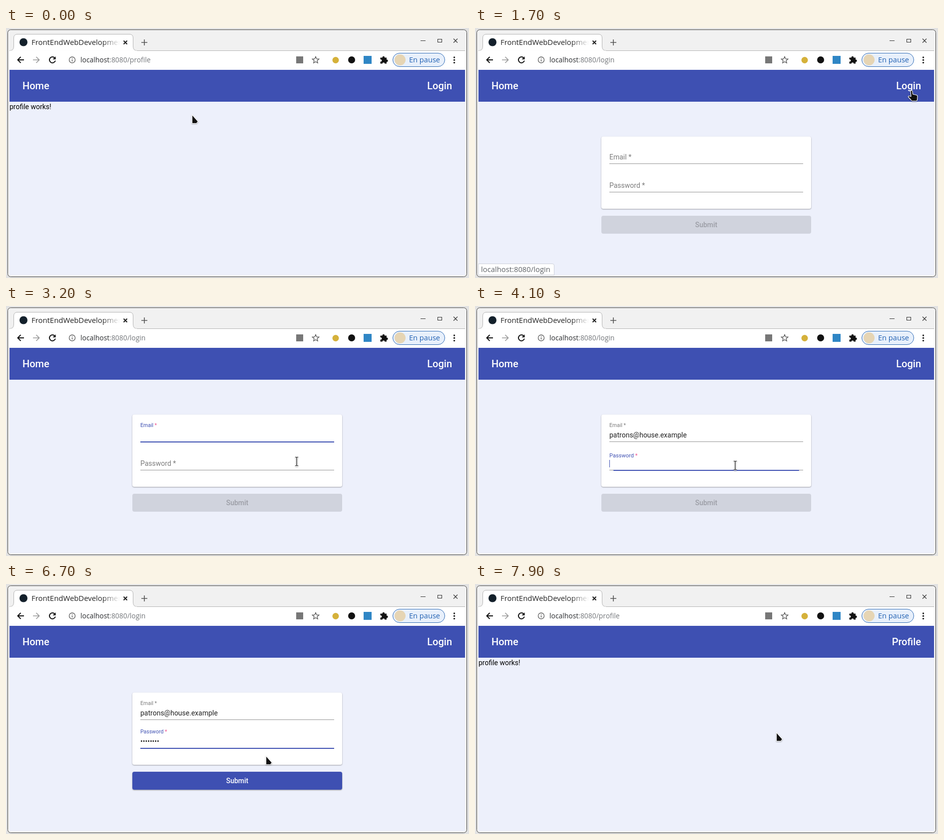
These frames come from a looping animation (927 px wide and 502 px high, 8000 ms). An HTML page:

```html
<!DOCTYPE html>
<html lang="en">
<head>
<meta charset="utf-8">
<title>Login flow</title>
<style>
  html, body { margin: 0; width: 100%; height: 100%; overflow: hidden; background: #e2e2e2; }
  svg { display: block; width: 100vw; height: 100vh; }
  text { font: 14px Roboto, sans-serif; white-space: pre; }
  .ui { font-family: "Open Sans", sans-serif; }
  .nav { font-size: 20px; font-weight: 500; fill: #fff; }
  .line { fill: none; stroke: #111; stroke-width: 2; }
  #card { filter: drop-shadow(0 1px 1px rgba(0,0,0,.35)); }
</style>
</head>
<body>
<svg viewBox="0 0 927 502">
  <defs>
    <linearGradient id="fade" gradientUnits="userSpaceOnUse" x1="192" x2="228" y1="0" y2="0">
      <stop stop-color="#222"/><stop offset="1" stop-color="#222" stop-opacity="0"/>
    </linearGradient>
    <clipPath id="buttonClip"><rect x="253" y="377" width="420" height="36" rx="4"/></clipPath>
  </defs>

  <!-- Window frame and tab strip -->
  <rect x="3.5" y="3.5" width="919" height="496" rx="6" fill="#f1f1f1" stroke="#444"/>
  <path d="M7 46H919V84H7Z" fill="#fff"/>
  <path d="M7 45.5Q15.5 45.5 15.5 37V20Q15.5 12.5 23 12.5H247Q254.500 12.5 254.500 20V37Q254.500 45.5 263 45.5H919" fill="#fff" stroke="#b4b4b4"/>
  <path d="M8 46H262" stroke="#fff"/>
  <circle cx="35" cy="28.500" r="8" fill="#13202b"/>
  <text class="ui" x="51" y="34" style="font-size:14.9px" fill="url(#fade)">FrontEndWebDevelopment</text>
  <path class="line" d="M235.500 25.500l7 7m0-7l-7 7" style="stroke-width:1.8"/>
  <path class="line" d="M271 29H283M277 23V35" style="stroke:#555;stroke-width:1.6"/>
  <path class="line" d="M830 25.500H840M864.500 22.500h8v6h-8zM896 21.500l8 8m0-8l-8 8" style="stroke:#333;stroke-width:1.1"/>

  <!-- Address bar -->
  <path class="line" d="M36 64H23.500M29.500 58L23.500 64L29.500 70"/>
  <path class="line" d="M54 64H66.500M60.500 58L66.500 64L60.500 70" style="stroke:#999;stroke-width:1.7"/>
  <path class="line" d="M97.500 60A6 6 0 1 0 98.800 65.500"/>
  <path d="M99.500 57V63H93.500Z" fill="#111"/>
  <circle cx="132.500" cy="64" r="6" fill="none" stroke="#666" stroke-width="1.4"/>
  <path d="M132.500 60.500v1.500M132.500 63.300v4" stroke="#666" stroke-width="1.5"/>
  <text class="ui" x="149" y="69" style="font-size:13.9px" fill="#2b2d30">localhost<tspan id="path" fill="#74777b"></tspan></text>
  <rect x="581" y="57" width="14" height="14" fill="#777"/>
  <path d="M620 57.500L621.900 61.900L626.700 62.300L623 65.500L624.100 70.200L620 67.700L615.900 70.200L617 65.500L613.300 62.300L618.100 61.900Z" fill="none" stroke="#555" stroke-width="1.3"/>
  <circle cx="660" cy="64.500" r="6.500" fill="#d5b13a"/>
  <circle cx="692" cy="64" r="7" fill="#111"/>
  <rect x="716" y="56" width="16" height="16" fill="#2f86c5"/>
  <path d="M749.500 59.500h4.200a2.200 2.200 0 1 1 4.300 0h4v4.200a2.200 2.200 0 1 1 0 4.300v3.500h-3.800a2.300 2.300 0 1 0-4.600 0h-4.100v-4a2.300 2.300 0 1 0 0-4.400z" fill="#111"/>
  <rect x="774.500" y="50.500" width="104" height="27" rx="13.500" fill="#e8f0fb" stroke="#2d6ab5"/>
  <circle cx="789" cy="64" r="11" fill="#e6d5b4"/>
  <text class="ui" x="807" y="69" style="font-size:14.6px" fill="#2161b3">En pause</text>
  <g fill="#222"><circle cx="897.500" cy="59" r="1.700"/><circle cx="897.500" cy="64.300" r="1.700"/><circle cx="897.500" cy="69.600" r="1.700"/></g>

  <!-- Page -->
  <rect x="7" y="84" width="912" height="412" fill="#edf0fb"/>
  <rect x="7" y="84" width="912" height="64" fill="#3e50b2"/>
  <text class="nav" x="33" y="123">Home</text>
  <text class="nav" id="account" x="893" y="123" text-anchor="end"></text>
  <text id="profile" x="7" y="163">profile works!</text>
  <g id="form">
    <rect id="card" x="253" y="218" width="420" height="145" rx="4" fill="#fff"/>
    <g id="fields"></g>
    <rect id="button" x="253" y="377" width="420" height="36" rx="4"/>
    <circle id="ripple" cx="520" cy="400" fill="#fff" fill-opacity=".1" clip-path="url(#buttonClip)"/>
    <text id="submit" x="463" y="400" text-anchor="middle" font-weight="500" style="font-weight:500">Submit</text>
  </g>
  <g id="status">
    <path d="M7 473.500H155Q158.500 473.500 158.500 477V496H7Z" fill="#fff" stroke="#ccd0da"/>
    <text class="ui" x="12" y="490" style="font-size:14.8px" fill="#5f6368">localhost:8080/login</text>
  </g>

  <g id="pointer" stroke="#fff" stroke-linejoin="round" style="filter:drop-shadow(0 1px 1px rgba(0,0,0,.35))">
    <path id="arrow" d="M.500 0V17.500H9.500L12.500 13.500Z" fill="#111" stroke-width="1.200"/>
    <path id="hand" d="M-2 1Q-2 -.500 0 -.500Q1.800 -.500 2 1.500L2.600 7L9.500 8.500Q12 9 12 11.500L11.500 18.500Q11 20.500 9 20.500H2Q0 20.500 -1.500 18L-6.500 12.500Q-7 11 -5 10.500L-1 11.500Z" fill="#111" stroke-width="1.200"/>
    <g id="beam" fill="none">
      <path d="M-3 -8.500H3M0 -8.500V8.500M-3 8.500H3" stroke-width="3"/>
      <path d="M-3 -8.500H-.800L0 -7.500L.800 -8.500H3M0 -7.500V7.500M-3 8.500H-.800L0 7.500L.800 8.500H3" stroke="#111" stroke-width="1.200"/>
    </g>
  </g>
</svg>
<script>
const LOOP = 8000, STEP = 100;
const EMAIL = "patrons@house.example";
const INDIGO = [62, 80, 178], DISABLED = [208, 211, 221];
const emailFocus = 2663, passwordFocus = 3963, submitPress = 6935;
const keyTimes = [4470, 4700, 5000, 5200, 5700, 5700, 5900, 6100];

// time, x, y, shape; the pointer glides between neighbouring rows
const pointerPath = [
  [0, 372, 174, "arrow"], [500, 372, 174, "arrow"], [600, 620, 140, "arrow"], [700, 849, 106, "hand"],
  [800, 849, 106, "hand"], [900, 832, 118, "arrow"], [1000, 856, 122, "hand"], [1100, 874, 126, "hand"],
  [1700, 874, 126, "hand"], [1800, 862, 140, "hand"], [1900, 820, 168, "arrow"], [2100, 705, 218, "arrow"],
  [2200, 655, 236, "beam"], [2300, 620, 248, "beam"], [2400, 586, 255, "beam"], [2500, 589, 256, "beam"],
  [2700, 589, 256, "beam"], [2800, 588, 272, "beam"], [3000, 582, 312, "beam"], [3500, 582, 312, "beam"],
  [3900, 521, 320, "beam"], [6600, 521, 320, "beam"], [6700, 520, 345, "arrow"], [6800, 518, 380, "hand"],
  [6900, 518, 391, "hand"], [7300, 518, 390, "arrow"], [7800, 518, 390, "arrow"], [7900, 603, 298, "arrow"],
  [LOOP, 603, 298, "arrow"]
];

const $ = id => document.getElementById(id);
const clamp = v => Math.min(1, Math.max(0, v));
const mix = (a, b, p) => a + (b - a) * p;
const set = (el, attrs) => { for (const k in attrs) el.setAttribute(k, attrs[k]); };
const show = (el, on) => { el.style.display = on ? "" : "none"; };

function bezier(x1, y1, x2, y2) {
  const at = (a, b, s) => 3 * a * s * (1 - s) ** 2 + 3 * b * s * s * (1 - s) + s ** 3;
  return x => {
    x = clamp(x);
    let lo = 0, hi = 1;
    for (let i = 0; i < 24; i++) {
      const mid = (lo + hi) / 2;
      if (at(x1, x2, mid) < x) lo = mid; else hi = mid;
    }
    return at(y1, y2, (lo + hi) / 2);
  };
}
const swift = bezier(.25, .8, .25, 1);
const decelerate = bezier(0, 0, .2, 1);

function makeField(name, baseline, focusAt, blurAt) {
  const g = document.createElementNS("http://www.w3.org/2000/svg", "g");
  g.innerHTML = `<text x="269">${name} <tspan>*</tspan></text>
    <text x="269" y="${baseline}" fill="#222"></text>
    <rect x="269" y="${baseline + 8}" width="388" height="1" fill="#949494"/>
    <rect y="${baseline + 8}" height="2" fill="#3e50b2"/>
    <rect y="${baseline - 12}" width="1" height="15" fill="#3e50b2"/>`;
  $("fields").append(g);
  const [label, value, , bar, caret] = g.children;
  const star = label.firstElementChild;

  return (t, text, caretX, caretOn) => {
    const focused = t >= focusAt && t < blurAt;
    const lift = swift((t - focusAt) / 400);
    const width = 388 * mix(.5, 1, swift((t - focusAt) / 300));
    label.setAttribute("y", baseline - 21 * lift);
    label.style.fontSize = 14 - 3.5 * lift + "px";
    label.setAttribute("fill", focused ? "#3e50b2" : "#7c7c7c");
    star.setAttribute("fill", focused ? "#f0508c" : "#7c7c7c");
    value.textContent = text;
    set(bar, { x: 463 - width / 2, width });
    show(bar, focused);
    set(caret, { x: caretX });
    show(caret, focused && caretOn);
  };
}
const drawEmail = makeField("Email", 264, emailFocus, passwordFocus);
const drawPassword = makeField("Password", 321, passwordFocus, submitPress);

function drawPointer(t) {
  const i = pointerPath.findIndex(row => row[0] > t);
  const [t0, x0, y0, shape] = pointerPath[i - 1], [t1, x1, y1] = pointerPath[i];
  const p = (t - t0) / (t1 - t0);
  $("pointer").setAttribute("transform", `translate(${mix(x0, x1, p)} ${mix(y0, y1, p)})`);
  for (const id of ["arrow", "hand", "beam"]) show($(id), id === shape);
}

function drawButton(t) {
  const enabled = t >= keyTimes[0];
  const p = swift((t - keyTimes[0]) / 400);
  const color = DISABLED.map((c, i) => Math.round(mix(c, INDIGO[i], p)));
  $("button").setAttribute("fill", `rgb(${color})`);
  $("button").style.filter = enabled ? "drop-shadow(0 1px 1px rgba(0,0,0,.4))" : "none";
  $("submit").setAttribute("fill", enabled ? "#fff" : "#9b9da5");
  $("ripple").setAttribute("r", 268 * decelerate((t - submitPress) / 450));
}

function draw(t) {
  const signedIn = t >= 7300;
  const onForm = t >= 1700 && !signedIn;
  $("path").textContent = ":8080/" + (t >= 1600 && !signedIn ? "login" : "profile");
  $("account").textContent = signedIn ? "Profile" : "Login";
  show($("profile"), !onForm);
  show($("form"), onForm);
  $("status").style.opacity = clamp((t - 1200) / 200) * clamp((2400 - t) / 200);

  const typed = keyTimes.filter(k => k <= t);
  const lastKey = typed.length ? typed[typed.length - 1] : passwordFocus;
  drawEmail(t, t >= 3300 ? EMAIL : "", 269, t < 3200);
  drawPassword(t, "•".repeat(typed.length), Math.floor(269 + 4.75 * typed.length),
    Math.floor((t - lastKey) / 500) % 2 === 0);
  drawButton(t);
  drawPointer(t);
}

function tick() {
  draw(Math.floor(performance.now() % LOOP / STEP) * STEP);
  requestAnimationFrame(tick);
}
tick();
</script>
</body>
</html>
```
